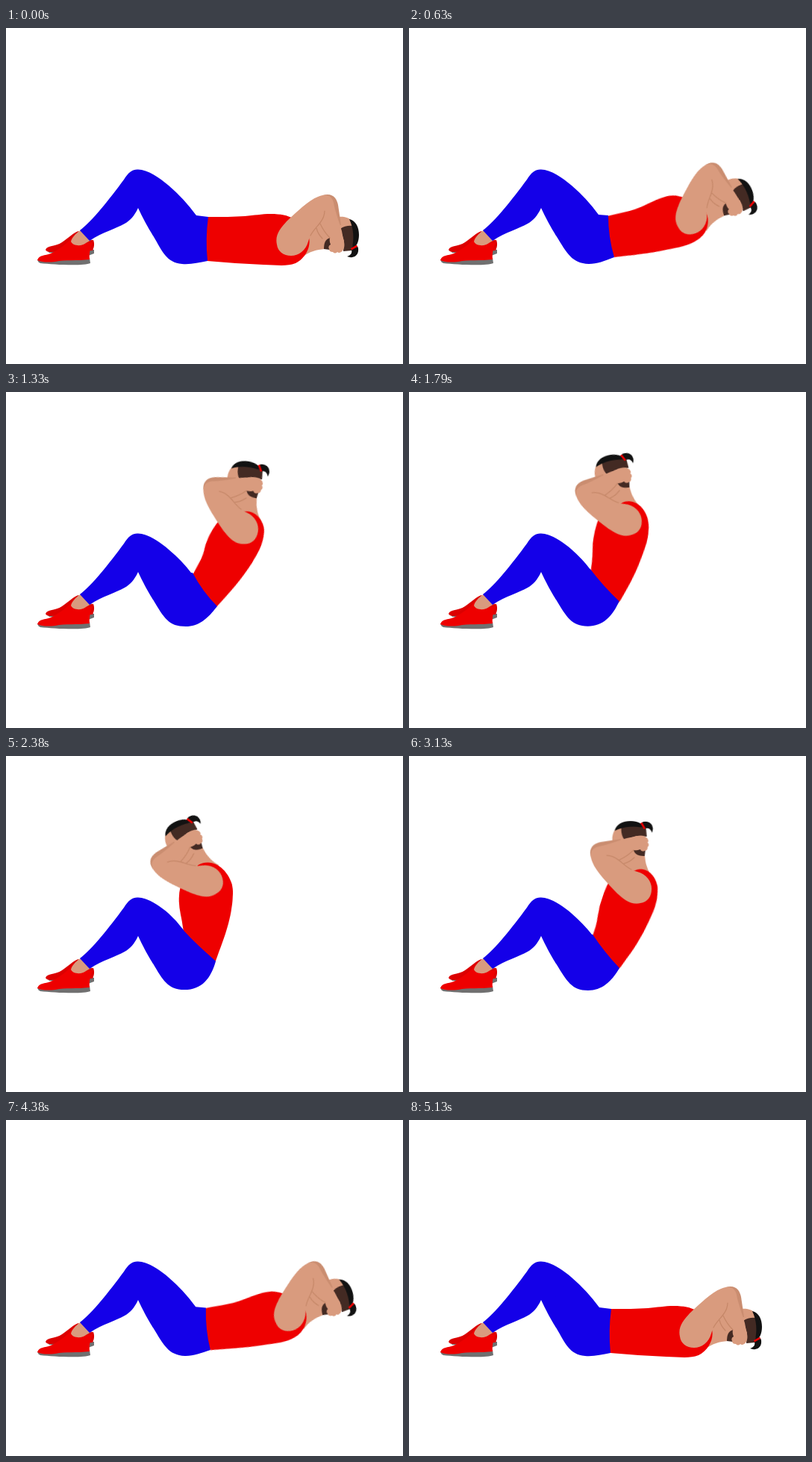
An HTML page without scripts that plays this animation: 532 px wide and 450 px high, repeating every 5.17 s.

```html
<!DOCTYPE html>
<html lang="en">
<head>
<meta charset="utf-8">
<title>Sit-up</title>
<style>
html, body { margin: 0; width: 100%; height: 100%; overflow: hidden; background: #fff; }
svg { display: block; width: 532px; height: 450px; }
.red { fill: #ee0000; }
.far { fill: #dc0000; }
.blue { fill: #1400e8; }
.skin { fill: #d99b7e; }
.shade { fill: #ca8d70; }
.sole { fill: #707070; }
.brown { fill: #432a23; }
.black { fill: #121212; }
.line { fill: none; stroke: #c58768; stroke-width: 1.2; stroke-linecap: round; }

.hip, .upper, .torso, .pelvis { animation: 5170ms linear infinite; }
.hip { animation-name: hip; }
.upper { animation-name: upper; }
.torso { animation-name: torso; }
.pelvis { animation-name: pelvis; }

/* Trunk swings about the hip */
@keyframes hip {
  0%, 2.9%, 97.9%, 100% { transform: rotate(0deg); }
  12.19%, 80.97% { transform: rotate(-15deg); }
  18.72%, 72.53% { transform: rotate(-39deg); }
  25.73%, 63.4% { transform: rotate(-64.6deg); }
  28.43%, 60.54% { transform: rotate(-71.9deg); }
  45.07% { transform: rotate(-91.2deg); }
  2.9% { animation-timing-function: cubic-bezier(.45, 0, .75, .5); }
  28.43% { animation-timing-function: cubic-bezier(.33, .6, .6, 1); }
  45.07% { animation-timing-function: cubic-bezier(.4, 0, .75, .5); }
  80.97% { animation-timing-function: cubic-bezier(.25, .65, .5, 1); }
}

/* Head and arms curl a little further about the shoulder */
@keyframes upper {
  0%, 2.9%, 97.9%, 100% { transform: translate(112px, 0px) rotate(0deg); }
  12.19%, 80.97% { transform: translate(111px, 0px) rotate(-5deg); }
  18.72%, 72.53% { transform: translate(108px, 0px) rotate(-8.5deg); }
  25.73%, 63.4% { transform: translate(111.8px, 0px) rotate(-16deg); }
  28.43%, 60.54% { transform: translate(112.6px, 0px) rotate(-18.5deg); }
  45.07% { transform: translate(117px, .5px) rotate(-23deg); }
  2.9% { animation-timing-function: cubic-bezier(.45, 0, .75, .5); }
  28.43% { animation-timing-function: cubic-bezier(.33, .6, .6, 1); }
  45.07% { animation-timing-function: cubic-bezier(.4, 0, .75, .5); }
  80.97% { animation-timing-function: cubic-bezier(.25, .65, .5, 1); }
}

@keyframes torso {
  0%, 2.9%, 97.9%, 100% { d: path("M-12 0L1 -32C20 -32 35 -32 50 -33C63 -34 72 -36 85 -36C98 -36 108 -34 114 -30L136 -4C139 8 131 24 118 30C105 35 90 32 75 32C50 31 25 29 0 27Z"); }
  12.19%, 80.97% { d: path("M-12 0L4 -33C20 -33 35 -31 50 -33C65 -35 74 -38 88 -38C98 -38 104 -34 109 -31L133 -5C137 6 130 24 113 29C100 34 85 32 69 31C45 30 22 26 -1 22.6Z"); }
  18.72%, 72.53% { d: path("M-12 0L10 -34C25 -35 40 -35 55 -36C68 -37 78 -39 90 -39C98 -39 104 -36 109 -33L132 -9C139 8 128 25 113 30C100 34 85 33 71 31C45 28 20 22 -3 16Z"); }
  25.73%, 63.4% { d: path("M-12 0L20 -34C30 -36 40 -34 52 -34C62 -34 70 -37.5 82 -37.5C92 -37.5 104 -36 108 -34L134 -9C143 4 133 22 120 27C105 33 90 31 77 30C50 27 25 19 4 12.6Z"); }
  28.43%, 60.54% { d: path("M-12 0L25 -36C35 -37 45 -36 54 -37C63 -38 70 -40 82 -40C92 -40 104 -40 109 -38L137 -8C146 4 136 24 117 28C100 33 85 30 69 28C45 25 25 18 6 12Z"); }
  45.07% { d: path("M-12 0L35 -30C45 -31 55 -32 70 -35C80 -37 85 -38 95 -38C100 -38 105 -37 110 -36L139 -13C148 2 140 24 113 33C100 36 80 33 60 28C42 23 25 16 11 11Z"); }
  2.9% { animation-timing-function: cubic-bezier(.45, 0, .75, .5); }
  28.43% { animation-timing-function: cubic-bezier(.33, .6, .6, 1); }
  45.07% { animation-timing-function: cubic-bezier(.4, 0, .75, .5); }
  80.97% { animation-timing-function: cubic-bezier(.25, .65, .5, 1); }
}

@keyframes pelvis {
  0%, 2.9%, 97.9%, 100% { d: path("M185 250L218 211Q238 228 255 251L271 253Q267 282 270 312C258 314 248 317 236 316C215 314 210 300 197 278Z"); }
  12.19%, 80.97% { d: path("M185 250L218 211Q238 228 254 250L267 251Q267 280 275 307C262 312 252 316 241 316C218 315 212 302 197 278Z"); }
  18.72%, 72.53% { d: path("M185 250L218 211Q238 228 253 248L259 247Q266 272 278 299C264 307 253 315 241 315C219 315 212 303 197 278Z"); }
  25.73%, 63.4% { d: path("M185 250L218 211Q236 226 248 242L250 242Q263 267 283 287C270 304 258 314 241 314C218 314 212 303 197 278Z"); }
  28.43%, 60.54% { d: path("M185 250L218 211Q234 225 245 239L246 239Q262 263 282 284C271 303 258 314 240 314C218 314 212 302 197 278Z"); }
  45.07% { d: path("M185 250L218 211Q229 221 237 232L238 234Q256 253 281 274C275 297 263 313 239 313C217 313 210 300 197 278Z"); }
  2.9% { animation-timing-function: cubic-bezier(.45, 0, .75, .5); }
  28.43% { animation-timing-function: cubic-bezier(.33, .6, .6, 1); }
  45.07% { animation-timing-function: cubic-bezier(.4, 0, .75, .5); }
  80.97% { animation-timing-function: cubic-bezier(.25, .65, .5, 1); }
}
</style>
</head>
<body>
<svg viewBox="0 0 532 450">
  <g transform="translate(270 285)">
    <g class="hip">
      <!-- head and neck -->
      <g class="upper"><g transform="translate(-382 -285)">
        <path class="skin" d="M388 297L397 307C407 299 416 297 427 296L440 296L464 292L467 264C463 253 452 252 444 253L424 240L400 285Z"/>
        <path class="brown" d="M448 269Q455 264 465 265L467 284L463 298L452 299L453 285Z"/>
        <path class="black" d="M460 256C469 258 473 267 473 277C473 286 470 293 463 297C467 284 466 268 460 256Z"/>
        <path class="black" d="M463 297C469 288 473 292 472 299C471 306 464 309 457 306C462 304 464 302 463 297Z"/>
        <path class="red" d="M462 295L470 290.5L471 293L463 297.5Z"/>
        <path class="brown" d="M426 296C426 288 428 283 434 281L437 289L434 297Z"/>
      </g></g>

      <path class="torso red" d="M-12 0L1 -32C20 -32 35 -32 50 -33C63 -34 72 -36 85 -36C98 -36 108 -34 114 -30L136 -4C139 8 131 24 118 30C105 35 90 32 75 32C50 31 25 29 0 27Z"/>

      <!-- arms -->
      <g class="upper"><g transform="translate(-382 -285)">
        <path class="shade" d="M424 224C438 220 443 228 445 237L449 264L440 264Z"/>
        <path class="skin" d="M363 290C360 277 368 268 376 259C390 246 405 231 418 226C430 221 437 225 439 234C441 246 446 258 450 272L452 283C455 291 453 298 449 300Q446 302 444 300Q441 303 438 300Q433 300 433 296Q431 292 435 290Q433 286 434 281C428 272 424 262 426 246C421 262 408 272 405 286C402 298 392 305 382 305C372 305 364 299 363 290Z"/>
        <path class="line" d="M427 245C427 250 425 256 420 262C416 267 411 272 408 278M421 262Q426 273 434 281M416 268Q418 276 424 282"/>
      </g></g>
    </g>
  </g>

  <!-- shoes -->
  <path class="sole" d="M54 297L58 301L110 305L118 302L118 297Z"/>
  <path class="far" d="M53 297C55 291 66 293 75 287C84 281 89 275 97 272L106 283L117 284C119 289 118 294 116 298L60 300Q54 300 53 297Z"/>
  <path class="sole" d="M42 310L112 308L113 315C104 319 64 317 46 315Q43 314 42 310Z"/>
  <path class="red" d="M42 311C44 304 52 305 60 302C70 297 83 289 90 278L108 288L116 287C114 294 111 299 112 310C94 312 80 310 66 313C57 314 48 314 42 311Z"/>
  <path class="skin" d="M98 272L102 270L114 284L107 288C103 292 90 293 87 286C88 281 93 276 98 272Z"/>

  <!-- trousers -->
  <path class="blue" d="M99 271C116 258 138 230 158 203C164 193 170 189 177 189.5C190 190 205 200 218 211L225 250L197 278C190 267 183 254 177 241C172 252 166 258 159 262C147 269 130 273 112 285Z"/>
  <path class="pelvis blue" d="M185 250L218 211Q238 228 255 251L271 253Q267 282 270 312C258 314 248 317 236 316C215 314 210 300 197 278Z"/>
</svg>
</body>
</html>
```
